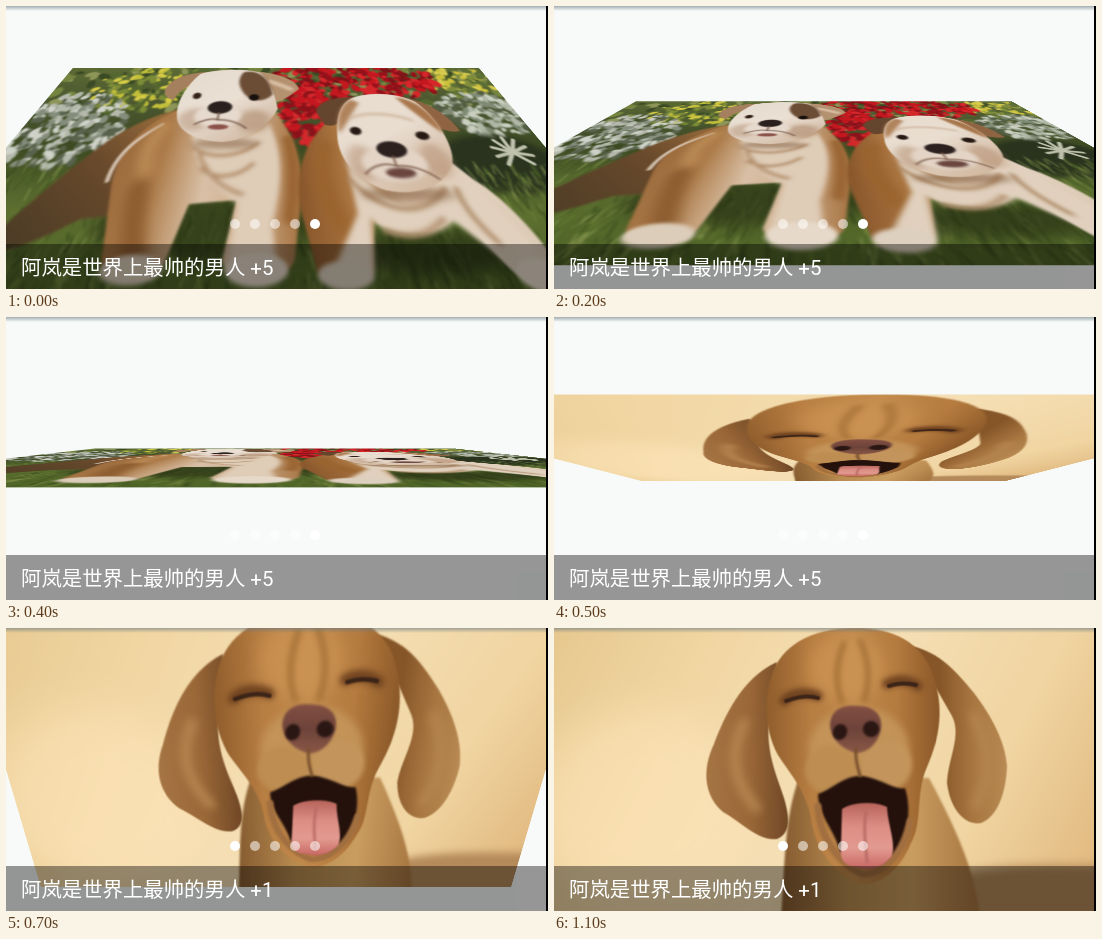
Write an HTML page with a canvas that moves like this. It is 542x283 px and loops after 1300 ms.

```html
<!DOCTYPE html>
<html lang="zh">
<head>
<meta charset="utf-8">
<style>
html, body { margin: 0; width: 100%; height: 100%; overflow: hidden; background: #000; }
#stage { position: relative; width: 540px; height: 283px; overflow: hidden; background: #f7faf8; perspective: 286px; perspective-origin: 270px 141.5px; }
#stage > * { position: absolute; left: 0; }
canvas { top: 0; width: 540px; height: 283px; }
#shade { top: 0; width: 540px; height: 5px; background: linear-gradient(#6b7b8599, #6b7b8500); }
#caption { top: 238px; width: 525px; height: 45px; padding-left: 15px; background: rgba(0,0,0,.4); color: #fff; font: 20.4px/48px Roboto, "Noto Sans CJK SC", "Noto Sans CJK", sans-serif; white-space: pre; }
#stage > #dots { top: 213px; left: 224px; display: flex; gap: 10px; }
#dots i { width: 10px; height: 10px; border-radius: 50%; background: rgba(255,255,255,.55); }
#dots i.on { background: #fff; }
</style>
</head>
<body>
<div id="stage">
  <canvas id="lawn" width="1080" height="566"></canvas>
  <canvas id="yawn" width="1080" height="566"></canvas>
  <div id="shade"></div>
  <div id="caption"></div>
  <div id="dots"><i></i><i></i><i></i><i></i><i></i></div>
</div>
<script>
const $ = id => document.getElementById(id);
let seed = 7;
const rnd = () => (seed = seed * 16807 % 2147483647) / 2147483647;
let g;

function begin(id) {
  g = $(id).getContext('2d');
  g.scale(2, 2);
  g.lineCap = 'round';
}
const soften = blur => g.filter = blur ? `blur(${blur}px)` : 'none';
function fill(d, color, blur = 1) {
  soften(blur);
  g.fillStyle = color;
  g.fill(new Path2D(d));
}
function line(d, color, width, blur = 1) {
  soften(blur);
  g.strokeStyle = color;
  g.lineWidth = width;
  g.stroke(new Path2D(d));
}
function oval(x, y, rx, ry, color, blur = 1, turn = 0) {
  soften(blur);
  g.fillStyle = color;
  g.beginPath();
  g.ellipse(x, y, rx, ry, turn, 0, 7);
  g.fill();
}
function gradient(x0, y0, x1, y1, ...colors) {
  const grad = g.createLinearGradient(x0, y0, x1, y1);
  colors.forEach((c, i) => grad.addColorStop(i / (colors.length - 1), c));
  return grad;
}
// Irregular leaves or petals inside an ellipse
function scatter(n, x, y, rx, ry, colors, size) {
  for (let i = 0; i < n; i++) {
    const a = rnd() * 6.283, r = Math.sqrt(rnd()), s = size * (.5 + rnd());
    oval(x + rx * r * Math.cos(a), y + ry * r * Math.sin(a), s, s * .6, colors[i % colors.length], 0, rnd() * 3);
  }
}

function drawGarden() {
  g.fillStyle = gradient(0, 0, 0, 283, '#5c6a34', '#4b5730', '#3c4a22', '#5d7030', '#4f6427');
  g.fillRect(0, 0, 540, 283);
  scatter(260, 270, 40, 300, 60, ['#3a4a24', '#75853f', '#54682f', '#8e9558'], 7);
  scatter(130, 105, 45, 58, 45, ['#c3bf3a', '#7c8b36', '#d6cb45', '#55682e'], 5);
  scatter(90, 500, 28, 46, 28, ['#cdc13c', '#7f8d3b', '#d8cc50', '#5d7036'], 5);
  scatter(260, 365, 30, 108, 40, ['#c5171f', '#98101a', '#d8262a', '#7d1418'], 6);
  scatter(110, 303, 85, 28, 52, ['#c5171f', '#8c121a', '#d4282c'], 6);
  scatter(300, 45, 110, 62, 58, ['#b4b9ac', '#858d7c', '#cfd2c8', '#59624c'], 5);
  scatter(200, 500, 90, 48, 38, ['#b0b7a6', '#7f8a74', '#cacfc0', '#525d42'], 5);
  oval(485, 160, 55, 36, '#2a331e', 8);
  for (let i = 0; i < 1300; i++) {
    const y = 172 + rnd() * 118;
    line(`M${rnd() * 540} ${y}l${rnd() * 8 - 4} ${-7 - rnd() * 9}`,
      ['#3f5320', '#6b8036', '#8a9a50', '#50682b', '#2f4119'][i % 5], 1, 0);
  }
  soften(2);
  g.drawImage(g.canvas, 0, 0, 540, 283);
  for (let i = 0; i < 9; i++) {
    const a = i * .6 - 4;
    line(`M503 148l${18 * Math.cos(a)} ${20 * Math.sin(a)}`, '#bfc2ac', 4, 1);
  }
  oval(215, 225, 95, 26, 'rgba(36,44,18,.65)', 14);
  oval(385, 245, 70, 18, 'rgba(36,44,18,.65)', 12);
}

function drawLeftPuppy() {
  fill('M165 82C135 92 108 112 88 150C70 182 56 210 45 246C72 250 90 234 110 220L150 215C180 205 200 180 195 150Z',
    gradient(50, 240, 170, 90, '#4a3b25', '#6a4a2c', '#a0733f'), 3);
  fill('M158 86C122 112 114 150 123 188L141 254C150 272 184 270 188 254L196 206L236 202L230 254C240 273 278 271 284 252L294 186C293 138 280 100 262 84Z',
    gradient(115, 0, 295, 0, '#9a6a3c', '#ad7c4a', '#d9c0a6', '#cfae8c', '#a06b38'), 2);
  line('M148 108C128 128 113 148 117 182', '#d5c3b0', 4, 2);
  line('M148 190C151 214 157 236 163 250', '#8d5d31', 18, 10);
  line('M152 110C142 130 140 150 148 170', '#bb8b55', 12, 10);
  fill('M182 120C212 143 248 130 262 105C278 150 276 185 267 225L270 256C262 271 240 270 234 258L238 205C213 190 192 165 182 120Z', '#dfcdb8', 5);
  line('M188 142C208 158 235 154 252 135M200 168C215 182 235 178 248 162M195 150C205 175 222 190 240 196', '#b28d6a', 4, 5);
  line('M282 130C288 160 286 190 281 220', '#9a6533', 10, 6);
  oval(165, 260, 23, 11, '#dccdba', 3);
  oval(256, 260, 23, 12, '#e6d9c9', 3);
  oval(218, 136, 34, 7, 'rgba(120,80,48,.5)', 8);
  fill('M150 66C132 62 130 38 146 22C158 12 172 9 184 10L176 32C160 38 152 50 150 66Z', '#a5805f');
  fill('M240 8C270 10 296 26 298 46C286 60 276 70 267 72Z', '#b4916f');
  line('M262 30C274 36 282 42 288 46', '#dcc2a8', 7, 5);
  fill('M172 14C187 3 231 0 249 11C264 28 270 66 272 83C262 111 240 132 215 134C189 133 165 119 160 94C153 67 161 34 172 14Z',
    gradient(160, 0, 270, 136, '#e4dacd', '#ebe0d4', '#cbb097'));
  fill('M228 10C248 2 264 27 266 56C257 72 241 71 232 55C225 43 220 26 228 10Z', '#6b4d35', 3);
  oval(180, 100, 18, 18, 'rgba(176,140,112,.5)', 9);
  oval(246, 102, 18, 18, 'rgba(176,140,112,.6)', 9);
  oval(205, 94, 26, 18, '#e6d9cd', 5);
  oval(176, 59, 5, 6, '#342118', 2);
  oval(244, 62, 6, 6, '#17100c', 2);
  oval(206, 80, 14, 11, '#2a201d', 2);
  line('M182 108C192 100 202 98 206 101C218 100 230 106 238 114M206 89V100', '#74594a', 2, 2);
  oval(208, 112, 11, 4, '#8b5148', 2);
}

function drawRightPuppy() {
  fill('M342 88C310 115 285 160 291 213L300 262C312 277 338 273 341 258L350 222C370 236 404 235 420 212L438 255C447 276 470 280 478 267C477 232 466 198 450 181L425 140Z',
    gradient(285, 0, 475, 0, '#85532a', '#a9743f', '#d6bfa6', '#e6d6c4', '#dccab5'), 2);
  line('M318 140C308 170 312 195 322 225', '#9a642f', 16, 10);
  fill('M338 145C350 190 368 205 385 210C410 205 430 184 442 177L474 262C464 276 448 268 439 253L415 222C390 238 355 238 348 218L341 262C330 271 320 268 313 258L338 215Z', '#e0d0bd', 4);
  line('M337 180C358 215 390 222 420 190M357 230C378 238 390 233 407 220M430 190C428 210 434 225 442 240', '#ab8763', 4, 5);
  oval(320, 264, 20, 10, '#ddd0bf', 3);
  oval(461, 264, 18, 12, '#e8dccb', 3);
  oval(385, 196, 42, 7, 'rgba(125,85,52,.55)', 8);
  fill('M316 90C315 74 333 61 364 61L350 91C342 106 330 114 322 108Z', '#64452e');
  fill('M416 62C446 66 462 94 464 118C452 123 438 112 431 97Z', '#8f6443');
  fill('M360 63C382 51 416 53 432 70C448 94 450 146 436 165C420 188 393 199 367 192C344 182 329 157 334 122C337 92 346 72 360 63Z',
    gradient(340, 55, 430, 195, '#e9ddd0', '#e9ddd0', '#cdb095'));
  fill('M358 66C342 76 336 100 336 122C346 108 356 88 366 72Z', '#b0835c', 5);
  fill('M411 62C434 65 447 93 445 122C435 108 422 84 411 62Z', '#a8764b', 4);
  oval(352, 160, 14, 22, 'rgba(178,140,110,.5)', 9);
  oval(424, 158, 14, 22, 'rgba(178,140,110,.5)', 9);
  oval(383, 161, 31, 21, '#e3d4c6', 5);
  oval(354, 118, 6, 6, '#271a14', 2);
  oval(422, 125, 7, 6, '#271a14', 2);
  oval(385, 144, 15, 11, '#2c211f', 2);
  line('M353 174C364 162 377 161 384 165C400 163 412 172 419 180M384 153V165', '#846451', 2, 2);
  oval(386, 173, 14, 6, '#6b4640', 3);
  line('M352 98C365 90 394 87 419 102', '#c8ab8e', 3, 5);
}

function drawLawn() {
  begin('lawn');
  drawGarden();
  drawLeftPuppy();
  drawRightPuppy();
  soften(0);
}

function drawYawn() {
  begin('yawn');
  g.fillStyle = gradient(0, 0, 540, 283, '#e7c98f', '#f2d7a4', '#f5dfb4', '#f1d5a2', '#dfb67b');
  g.fillRect(0, 0, 540, 283);
  oval(90, 180, 110, 100, 'rgba(255,232,190,.5)', 40);
  fill('M405 247C450 235 500 237 560 238V300H405Z', '#b48a5a', 10);
  fill('M245 150C230 190 231 238 227 290H426C422 247 405 206 375 150Z',
    gradient(225, 0, 425, 0, '#83592f', '#b88b50', '#c99c60', '#a67540'), 2);
  fill('M223 34C190 49 172 84 160 116C147 143 151 169 169 184C190 196 204 213 223 211C238 205 235 187 230 170C222 145 210 122 216 82Z',
    gradient(155, 0, 235, 0, '#a57443', '#9b6838', '#6f4725'));
  fill('M358 18C386 25 401 42 420 65C438 89 451 113 453 138C452 166 443 189 427 195C410 198 396 180 393 155C394 130 408 108 398 88Z',
    gradient(385, 0, 453, 0, '#875628', '#a87741', '#b98a53'));
  line('M190 95C176 124 177 150 202 180M420 88C438 123 435 154 422 177', '#b5854f', 10, 9);
  fill('M222 37C237 10 268 0 302 0C340 0 367 15 378 44C391 79 386 109 373 139C361 166 369 194 357 215C346 242 326 257 309 256C288 253 261 226 257 190C251 161 236 146 224 127C207 95 211 59 222 37Z',
    gradient(215, 0, 385, 0, '#925f2d', '#b87e42', '#c18a4c', '#b57b3f', '#8b5828'));
  oval(292, 40, 38, 34, 'rgba(208,151,87,.65)', 15);
  line('M290 15C281 38 281 57 288 74M306 13C316 34 316 54 310 73', '#9c682f', 4, 6);
  oval(305, 122, 50, 43, '#c39358', 8);
  oval(277, 142, 26, 24, '#bd8d52', 5);
  oval(333, 137, 25, 25, '#c3955c', 5);
  line('M230 73C239 63 254 64 264 68M333 56C344 50 356 52 364 58', '#704320', 10, 6);
  line('M232 73C243 69 253 67 264 70M335 58C344 55 354 55 362 57', '#3b2418', 4);
  fill('M264 166C278 161 291 147 307 148C324 149 342 163 351 160C359 184 352 218 338 232C319 245 295 241 286 224C281 202 264 188 264 166Z', '#24110c', 2);
  line('M264 178C265 208 285 237 309 246C333 246 350 222 356 193', '#a16f40', 7, 2);
  fill('M288 181C298 174 321 173 333 179C334 198 342 214 338 228C329 240 316 243 303 239C292 239 285 232 287 219Z',
    gradient(0, 176, 0, 242, '#b9665d', '#dc8d83', '#e29a8f', '#c76561'), 1.5);
  line('M312 184C309 202 312 220 313 234', '#b76962', 2.5, 2);
  fill('M276 98C276 81 290 76 304 78C320 78 329 87 327 101C324 116 313 125 302 125C288 121 278 112 276 98Z',
    gradient(0, 77, 0, 125, '#845044', '#6d4339', '#8b5848'), 2);
  oval(286, 104, 7, 8, '#2a1714', 2, .4);
  oval(317, 101, 8, 8, '#2a1714', 2, -.4);
  line('M302 121C301 132 304 139 306 148', '#79502d', 3, 2);
  soften(0);
}

// Turn of the card in degrees, one value per 100 ms
const turns = [41.7, 54.5, 62, 68, 84, 103.6, 140, 162.6, 174, 179, 180, 180];
const dots = [...$('dots').children];

function render() {
  const step = Math.min(11, Math.floor(performance.now() % 1300 / 100));
  const turn = turns[step], flipped = turn > 90, page = step < 6 ? 5 : 1;
  $('lawn').style.display = flipped ? 'none' : '';
  $('yawn').style.display = flipped ? '' : 'none';
  $(flipped ? 'yawn' : 'lawn').style.transform = `rotateX(${flipped ? turn - 180 : turn}deg)`;
  $('caption').textContent = `阿岚是世界上最帅的男人 +${page}`;
  dots.forEach((dot, i) => dot.classList.toggle('on', i === page - 1));
  requestAnimationFrame(render);
}
drawLawn();
drawYawn();
render();
</script>
</body>
</html>
```
